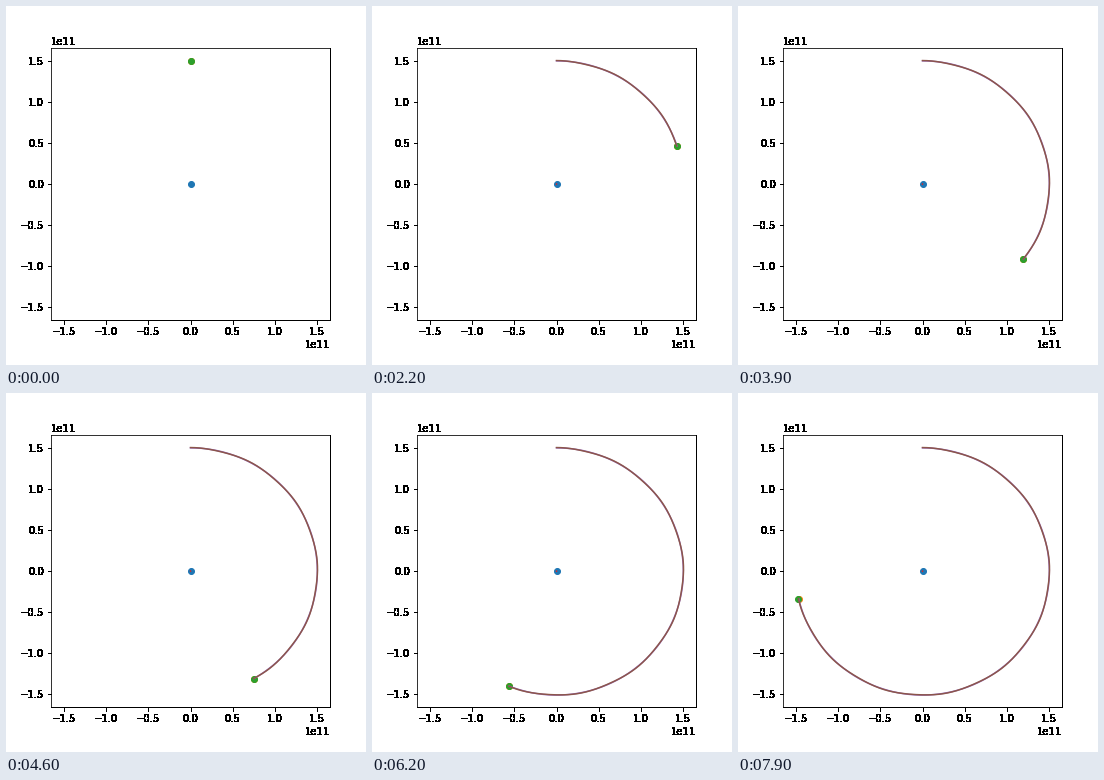
A matplotlib script that plays this animation: 360x359 px, repeating every 8 s.

```python
import numpy as np
import matplotlib.pyplot as plt
from matplotlib.animation import FuncAnimation

W, H, DPI = 360, 359, 72
FRAMES, INTERVAL = 80, 100

# Sun, earth and moon in SI units; positions are complex numbers x + iy
G = 6.674e-11
MASS = np.array([1.989e30, 5.972e24, 7.35e22])
START = np.array([0, 1.5e11j, 1.5e11j + 3.84e8j])
SPEED = np.array([0, 29780, 29780 + 1022], dtype=complex)
STEP, STEPS_PER_FRAME = 3600, 80
LIMIT = 1.1 * abs(START[2])


def simulate(steps):
    pos, vel = START.copy(), SPEED.copy()
    path = [pos]
    for _ in range(steps):
        gap = pos[None, :] - pos[:, None]
        dist = abs(gap)
        np.fill_diagonal(dist, 1)
        vel = vel + STEP * (G * MASS * gap / dist**3).sum(axis=1)
        pos = pos + STEP * vel
        path.append(pos)
    return np.array(path).T


def solid_black(img, dpi):
    """Turn every touched pixel fully black, leaving no soft edges."""
    out = np.zeros_like(img)
    out[..., 3] = img[..., 3] > 0
    return out, 0, 0


paths = simulate((FRAMES - 1) * STEPS_PER_FRAME)

fig = plt.figure(figsize=(W / DPI, H / DPI), dpi=DPI, facecolor="white")
ax = fig.add_axes([45 / W, 45 / H, 279 / W, 271.8 / H])
ticks = np.arange(-3, 4) * 0.5e11
ax.set(xlim=(-LIMIT, LIMIT), ylim=(-LIMIT, LIMIT), xticks=ticks, yticks=ticks)
for part in (ax.xaxis, ax.yaxis, ax.spines["bottom"], ax.spines["right"]):
    part.set_agg_filter(solid_black)

dots = [ax.plot([], [], "o", color=c, ms=6)[0] for c in ("C0", "C1", "C2")]
trails = [ax.plot([], [], color=c, lw=1.5)[0] for c in ("C3", "C4", "C5")]


def update(n):
    last = n * STEPS_PER_FRAME + 1
    for path, dot, trail in zip(paths, dots, trails):
        seen = path[:last]
        trail.set_data(seen.real, seen.imag)
        dot.set_data(seen.real[-1:], seen.imag[-1:])
    return dots + trails


anim = FuncAnimation(fig, update, frames=FRAMES, interval=INTERVAL,
                     init_func=lambda: update(0), repeat=True,
                     repeat_delay=0, blit=False)
plt.show()
```
